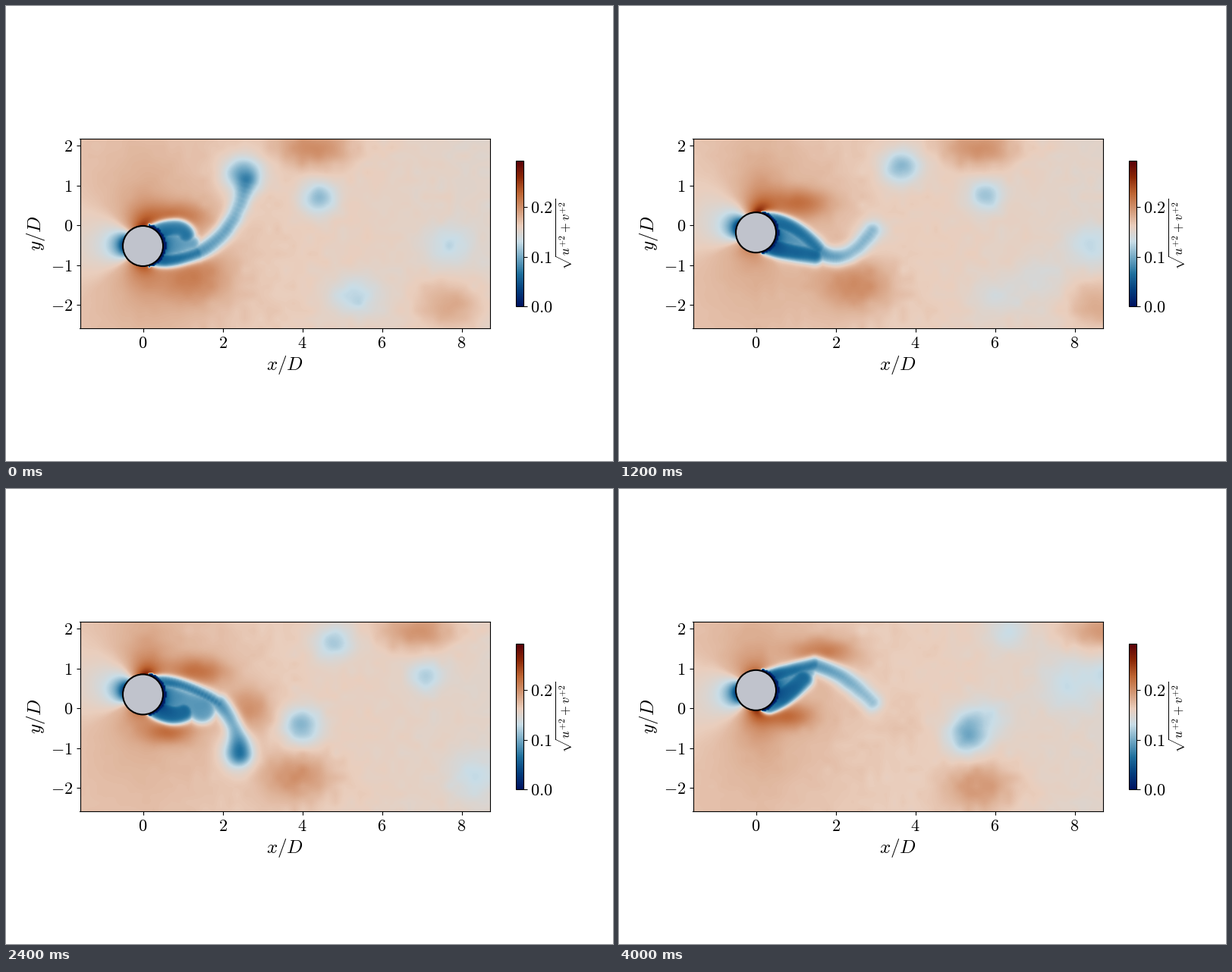
Write a matplotlib script that moves like this. It is 800 px wide and 600 px high and loops after 4200 ms.

```python
import matplotlib.pyplot as plt
import numpy as np
from matplotlib.animation import FuncAnimation
from matplotlib.colors import LinearSegmentedColormap
from matplotlib.patches import Circle

W, H, DPI = 800, 600, 100
FRAMES, INTERVAL = 21, 200
X0, X1, Y0, Y1 = -1.581, 8.714, -2.59, 2.162
VMAX = 0.293

plt.rcParams["mathtext.fontset"] = "cm"
CMAP = LinearSegmentedColormap.from_list("speed", [
    "#001261", "#033E7D", "#1E6F9D", "#71A8C4", "#C9DDE7",
    "#EACEBD", "#D39774", "#BE6533", "#8B2706", "#590008"])

xs = np.linspace(X0, X1, 271)
ys = np.linspace(Y0, Y1, 125)
X, Y = np.meshgrid(xs, ys)

# Shear layers at the key times: bend height, end x, end y, half width
KEYS = (0, 3, 7, 12, 15, 20)
TOP = [(.05, 1.05, -.25, .23), (-.1, 1.15, -.4, .3), (.1, 1.65, -.7, .165),
       (.72, 1.9, .1, .15), (.95, 1.5, .7, .15), (.95, 1.45, 1.1, .18)]
BOTTOM = [(-.95, 1.35, -.7, .17), (-.85, 1.2, -.75, .28), (-.58, 1.55, -.75, .21),
          (-.25, 1, -.1, .25), (.1, .95, .35, .27), (.25, 1.15, .75, .25)]
# Tail: bend x, y and tip x, y
TAIL = [(2.25, -.3, 2.6, 1.1), (2.3, -.7, 2.9, .5), (2.2, -1.3, 2.9, -.35),
        (2.35, -.35, 2.45, -1.15), (2.3, .5, 2.5, -.6), (2.2, .9, 2.9, .15)]


def keyed(n, table):
    return [np.interp(n, KEYS, column) for column in zip(*table)]


def drift(n, x, vx, y, vy, sx, sy, strength, start=-9, end=99):
    """Gaussian spot carried along a straight line, visible from start to end."""
    shown = np.clip(0.5 + (n - start) / 3, 0, 1) * np.clip(0.5 + (end - n) / 3, 0, 1)
    dx, dy = (X - x - vx * n) / sx, (Y - y - vy * n) / sy
    return shown * strength * np.exp(-dx**2 - dy**2)


def slow_spots(n):
    return [
        drift(n, 2.5, .19, 1.3, .03, .5, .45, .43 - .013 * n),
        drift(n, 4.4, .225, .68, .01, .45, .42, .33 - .009 * n),
        drift(n, 5.3, .12, -1.8, 0, .65, .5, .22, end=6),
        drift(n, 5.9, .2, -1, -.06, .6, .55, .16, start=6),
        drift(n, 7.7, .12, -.5, 0, .6, .5, .17, end=9),
        drift(n, 2, .165, -.1, -.03, .5, .48, .36, start=7),
        drift(n, .8, .13, -.45, -.057, .38, .42, .45, start=8, end=18),
        drift(n, 5.7, 0, -.25, 0, .7, .5, .17, start=18),
        drift(n, 7.9, 0, .6, 0, .8, .7, .16, start=18),
    ]


def fast_spots(n):
    return [
        drift(n, .8, .045, .2, .06, .75, .35, .043),
        drift(n, 1.2, .22, -1.3, -.035, .9, .65, .036),
        drift(n, .4, .02, -1.2, .05, .6, .3, .045, start=9),
        drift(n, 4.3, .22, 1.95, 0, .95, .5, .04),
        drift(n, 7.7, .15, -2.05, 0, .8, .6, .03, end=9),
        drift(n, 1.1, .13, .6, -.055, .55, .55, .033, start=9, end=19),
    ]


def curve(a, b, c):
    """Quadratic Bezier curve."""
    t = np.linspace(0, 1, 22)[:, None]
    return (1 - t)**2 * np.array(a) + 2 * t * (1 - t) * np.array(b) + t**2 * np.array(c)


def tube(path, widths, depths):
    dip = np.zeros_like(X)
    for (px, py), w, d in zip(path, np.broadcast_to(widths, 22), np.broadcast_to(depths, 22)):
        edge = 0.05 + 0.04 * px
        r = np.hypot(X - px, Y - py)
        np.maximum(dip, d * 0.5 * (1 + np.tanh((w - r) / edge)), out=dip)
    return dip


def wake(n):
    cy = body_y(n)
    top_y, *top_end, top_w = keyed(n, TOP)
    low_y, *low_end, low_w = keyed(n, BOTTOM)
    bend_x, bend_y, *tip = keyed(n, TAIL)
    top = curve((0.28, cy + 0.33), (0.95, top_y), top_end)
    low = curve((0.3, cy - 0.35), (0.7, low_y), low_end)
    switch = np.clip((n - 3) / 3, 0, 1)
    root = np.array(low_end) * (1 - switch) + np.array(top_end) * switch
    tail = curve(root, (bend_x, bend_y), tip)
    gap = np.hypot(*(top - low).T)
    return np.maximum.reduce([
        tube(top, top_w, 0.65),
        tube(low, low_w, 0.68),
        tube((top + low) / 2, 0.4 * gap, 0.5),
        tube(tail, 0.19, np.linspace(0.58, 0.36, 22)),
    ])


def make_mottle():
    rng = np.random.default_rng(4)
    cols, rows = 50, 24
    coarse = rng.normal(0, 1, (rows, cols))
    wide = np.array([np.interp(np.linspace(0, cols, xs.size), np.arange(cols + 1),
                               np.append(r, r[0])) for r in coarse])
    return np.array([np.interp(np.linspace(0, rows - 1, ys.size),
                               np.arange(rows), c) for c in wide.T]).T


MOTTLE = make_mottle()


def body_y(n):
    return 0.53 * np.sin(0.177 * (n - 8))


def speed(n):
    velocity = np.cos(0.177 * (n - 8))
    dy = Y - body_y(n)
    r = np.maximum(np.hypot(X, dy), 0.45)

    # flow around the cylinder, turned by its own motion
    c = np.cos(2 * (np.arctan2(dy, X) + 0.3 * velocity))
    q = 0.25 / r**2 * np.exp(-(np.maximum(X, 0) / 0.7)**2)
    side = 0.4 + 0.25 * velocity * dy / r
    field = (0.169 - 0.0018 * np.maximum(X, 0)) * (1 - q * c * np.where(c > 0, 1, side))
    field += 0.013 * np.exp(-((X - 0.7) / 1.7)**2 - (dy / 2.2)**2)
    field += sum(fast_spots(n))
    for spot in slow_spots(n):
        field *= 1 - spot
    field *= 1 - wake(n)

    field += 0.0016 * np.clip(0.5 + X / 5, 0.3, 1.3) * np.roll(MOTTLE, 5 * n, axis=1)
    field[(r < 0.56) & (X > 0.1)] = 0.008
    return np.clip(field, 0, VMAX)


def pixel_axes(left, top, right, bottom):
    return fig.add_axes([left / W, 1 - bottom / H, (right - left) / W, (bottom - top) / H])


def label(x, y, text, size, rotation=0):
    fig.text(x / W, 1 - y / H, text, fontsize=size, rotation=rotation,
             ha="center", va="center")


fig = plt.figure(figsize=(W / DPI, H / DPI), dpi=DPI, facecolor="white")
ax = pixel_axes(97.5, 175.5, 638, 425)
image = ax.imshow(speed(0), origin="lower", extent=(X0, X1, Y0, Y1), aspect="auto",
                  cmap=CMAP, vmin=0, vmax=VMAX, interpolation="bilinear")
body = ax.add_patch(Circle((0, body_y(0)), 0.505, facecolor="#c0c3cc",
                           edgecolor="black", linewidth=1.5, zorder=2))
ax.set_xticks(range(0, 9, 2), [f"${v}$" for v in range(0, 9, 2)])
ax.set_yticks(range(-2, 3), [f"${v}$" for v in range(-2, 3)])
ax.tick_params(labelsize=16)

bar = fig.colorbar(image, cax=pixel_axes(672, 204.5, 681.5, 396))
bar.set_ticks([0, 0.1, 0.2], labels=["$0.0$", "$0.1$", "$0.2$"])
bar.ax.tick_params(labelsize=16)

label(367, 473, "$x/D$", 18)
label(39, 300, "$y/D$", 18, 90)
label(735, 300.5, r"$\sqrt{u^{+2}+v^{+2}}$", 12, 90)


def update(n):
    image.set_data(speed(n))
    body.center = (0, body_y(n))
    return image, body


animation = FuncAnimation(fig, update, frames=FRAMES, interval=INTERVAL,
                          repeat=True, repeat_delay=0)
plt.show()
```
